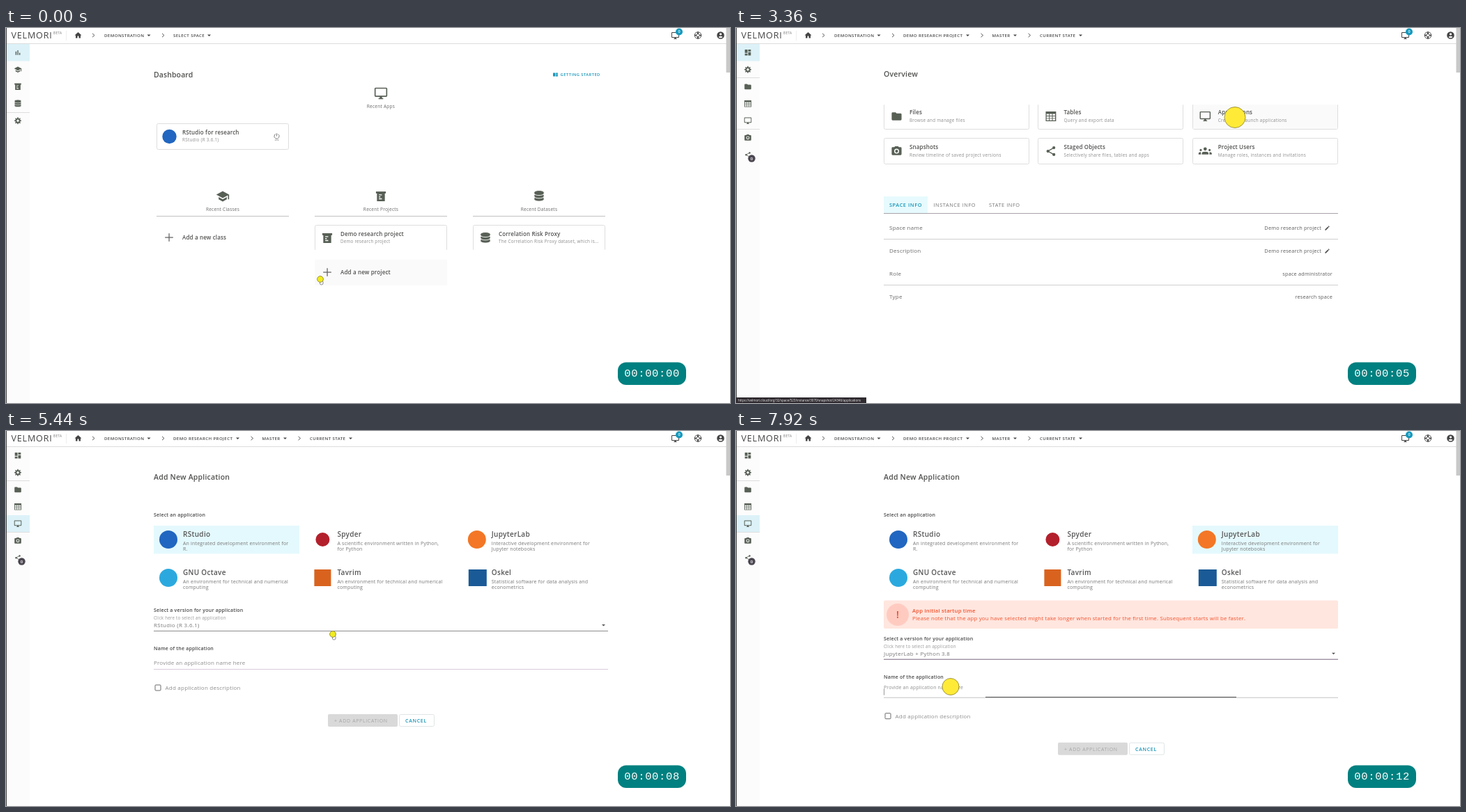
Animation of 1039 by 539 pixels, one loop 8000 ms. Source, as an HTML page with a canvas:

```html
<!DOCTYPE html>
<html lang="en">
<head>
<meta charset="utf-8">
<title>Workspace tour</title>
<style>
html, body { margin: 0; width: 100%; height: 100%; overflow: hidden; background: #fff; }
canvas { display: block; }
</style>
</head>
<body>
<canvas id="stage" width="1039" height="539"></canvas>
<script>
const ctx = document.getElementById('stage').getContext('2d');
const LOOP = 8000, STEP = 80;
const DARK = '#50524f', ICON = '#586056', GRAY = '#8b8d8b', TEAL = '#1695b8', LINE = '#c8c8c8';
const SANS = '"Open Sans", "Noto Sans", sans-serif';

const clamp = v => Math.max(0, Math.min(1, v));
const smooth = v => v * v * (3 - 2 * v);
const progress = (t, from, length) => clamp((t - from) / length);

// Text is placed by the vertical centre of its capitals.
function text(s, x, y, size, { color = DARK, weight = 400, gap = 0.2, align = 'left' } = {}) {
  ctx.font = `${weight} ${size}px ${SANS}`;
  ctx.letterSpacing = gap + 'px';
  ctx.textAlign = align;
  ctx.fillStyle = color;
  ctx.fillText(s, x, y + size * 0.36);
}
const bold = (s, x, y, size, color = DARK, gap = 0.15) => text(s, x, y, size, { color, weight: 600, gap });
const heading = s => bold(s, 212, 66, 10.5, DARK, 0.2);

function rect(x, y, w, h, color) {
  ctx.fillStyle = color;
  ctx.fillRect(x, y, w, h);
}
function hline(x1, x2, y, color = LINE) { rect(x1, y, x2 - x1, 1, color); }
function rounded(x, y, w, h, r, fill, stroke) {
  ctx.beginPath();
  ctx.roundRect(x, y, w, h, r);
  if (fill) { ctx.fillStyle = fill; ctx.fill(); }
  if (stroke) { ctx.strokeStyle = stroke; ctx.lineWidth = 1; ctx.stroke(); }
}
function disc(x, y, r, fill, stroke) {
  ctx.beginPath();
  ctx.arc(x, y, r, 0, Math.PI * 2);
  ctx.fillStyle = fill;
  ctx.fill();
  if (stroke) { ctx.strokeStyle = stroke; ctx.lineWidth = 0.8; ctx.stroke(); }
}
function openCard(x, y, w, h, openSide) {
  rounded(x + 0.5, y + 0.5, w - 1, h - 1, 2, '#fff', '#dedede');
  if (openSide === 'top') rect(x, y - 1, w, 3, '#fff');
  if (openSide === 'bottom') rect(x, y + h - 2, w, 3, '#fff');
}

// Icons live on a 24 unit grid.
const paths = {
  home: 'M10 20v-6h4v6h5v-8h3L12 3 2 12h3v8z',
  bars: 'M5 9h3v10H5zM10.6 5h2.8v14h-2.8zM16 13h3v6h-3z',
  school: 'M5 13.2v4L12 21l7-3.8v-4L12 17zM12 3L1 9l11 6 9-4.9V17h2V9z',
  folder: 'M10 4H4a2 2 0 0 0-2 2v12a2 2 0 0 0 2 2h16a2 2 0 0 0 2-2V8a2 2 0 0 0-2-2h-8z',
  board: 'M2 2h20v4h-2v16H4V6H2zM8 8v2h6V8zM8 12v2h3v-2zM8 16v2h6v-2z',
  tiles: 'M3 13h8V3H3zM3 21h8v-6H3zM13 21h8V11h-8zM13 3v6h8V3z',
  monitor: 'M3 2h18a2 2 0 0 1 2 2v12a2 2 0 0 1-2 2h-7v2h2v2H8v-2h2v-2H3a2 2 0 0 1-2-2V4a2 2 0 0 1 2-2zM3 4v12h18V4z',
  camera: 'M9 2L7.2 4H4a2 2 0 0 0-2 2v12a2 2 0 0 0 2 2h16a2 2 0 0 0 2-2V6a2 2 0 0 0-2-2h-3.2L15 2zM12 7a5 5 0 1 1 0 10 5 5 0 0 1 0-10zM12 9a3 3 0 1 0 0 6 3 3 0 0 0 0-6z',
  pencil: 'M3 17.3V21h3.8L17.8 9.9l-3.7-3.7zM20.7 7a1 1 0 0 0 0-1.4l-2.3-2.3a1 1 0 0 0-1.4 0l-1.9 1.8 3.8 3.8z',
  people: 'M12 5a3 3 0 1 1 0 6 3 3 0 0 1 0-6zM4 8a2 2 0 1 1 0 4 2 2 0 0 1 0-4zM20 8a2 2 0 1 1 0 4 2 2 0 0 1 0-4zM6 18v-2q0-3 6-3t6 3v2zM0 18v-2q0-2 4-2.5L4.5 18zM24 18v-2q0-2-4-2.5L19.5 18z',
  book: 'M1 4h10v16H1zM13 4h10v16H13zM15 8v1.5h6V8zM15 12v1.5h6V12z',
  account: 'M12 1a11 11 0 1 1 0 22 11 11 0 0 1 0-22zM12 5a3.5 3.5 0 1 0 0 7 3.5 3.5 0 0 0 0-7zM5.5 17q6.5 6 13 0-6.5-5-13 0z'
};
const shapes = Object.fromEntries(Object.entries(paths).map(([k, d]) => [k, new Path2D(d)]));

const drawn = {
  gear() {
    ctx.beginPath();
    for (let i = 0; i < 32; i++) {
      const a = (i - 0.5) / 32 * Math.PI * 2, r = i % 4 < 2 ? 10.5 : 7.5;
      ctx.lineTo(12 + r * Math.cos(a), 12 + r * Math.sin(a));
    }
    ctx.closePath();
    ctx.moveTo(15.5, 12);
    ctx.arc(12, 12, 3.5, 0, Math.PI * 2);
    ctx.fill('evenodd');
  },
  table() {
    ctx.beginPath();
    ctx.rect(1.5, 2, 21, 20);
    for (let i = 0; i < 9; i++) ctx.rect(3.3 + i % 3 * 6.2, 7.2 + Math.floor(i / 3) * 4.7, 4.8, 3.5);
    ctx.fill('evenodd');
  },
  buoy() {
    ctx.lineWidth = 2;
    for (const r of [10, 4.5]) {
      ctx.beginPath();
      ctx.arc(12, 12, r, 0, Math.PI * 2);
      ctx.stroke();
    }
    for (let i = 0; i < 4; i++) {
      const c = Math.cos(i * Math.PI / 2), s = Math.sin(i * Math.PI / 2);
      ctx.lineWidth = 4;
      ctx.beginPath();
      ctx.moveTo(12 + 5 * c, 12 + 5 * s);
      ctx.lineTo(12 + 10 * c, 12 + 10 * s);
      ctx.stroke();
    }
  },
  database() {
    const color = ctx.fillStyle;
    for (const y of [18, 12, 6]) {
      ctx.beginPath();
      ctx.ellipse(12, y, 10, 4, 0, 0, Math.PI);
      ctx.ellipse(12, y - 2, 10, 4, 0, Math.PI, 0);
      ctx.closePath();
      ctx.fillStyle = color;
      ctx.fill();
      ctx.strokeStyle = '#fff';
      ctx.lineWidth = 1.2;
      ctx.stroke();
    }
  },
  share() {
    ctx.lineWidth = 2;
    ctx.beginPath();
    ctx.moveTo(18, 5); ctx.lineTo(6, 12); ctx.lineTo(18, 19);
    ctx.stroke();
    for (const [x, y] of [[18, 5], [6, 12], [18, 19]]) disc(x, y, 3, ctx.fillStyle);
  },
  search() {
    ctx.lineWidth = 2.4;
    ctx.beginPath();
    ctx.arc(9.5, 9.5, 5.5, 0, Math.PI * 2);
    ctx.moveTo(14, 14); ctx.lineTo(20.5, 20.5);
    ctx.stroke();
  },
  power() {
    ctx.lineWidth = 1.8;
    ctx.beginPath();
    ctx.arc(12, 11, 8.5, -1.1, Math.PI + 1.1);
    ctx.moveTo(12, 1); ctx.lineTo(12, 11);
    ctx.stroke();
    for (const x of [6, 11, 16]) ctx.fillRect(x, 23, 2.4, 2.4);
  },
  plus() { ctx.fillRect(11, 2, 2.2, 20); ctx.fillRect(2, 11, 20, 2.2); },
  chevron() {
    ctx.lineWidth = 2.6;
    ctx.beginPath();
    ctx.moveTo(8, 5); ctx.lineTo(16, 12); ctx.lineTo(8, 19);
    ctx.stroke();
  },
  caret() {
    ctx.beginPath();
    ctx.moveTo(2, 8); ctx.lineTo(22, 8); ctx.lineTo(12, 18);
    ctx.fill();
  }
};

function icon(name, x, y, size, color = ICON, flip = 1) {
  ctx.save();
  ctx.translate(x, y);
  ctx.scale(size / 24 * flip, size / 24);
  ctx.translate(-12, -12);
  ctx.fillStyle = ctx.strokeStyle = color;
  if (drawn[name]) drawn[name]();
  else ctx.fill(shapes[name], 'evenodd');
  ctx.restore();
}

function topBar(inProject) {
  text('VELMORI', 7.5, 10.5, 12.5, { gap: 0.85, color: '#444' });
  text('BETA', 68, 7.5, 4.8, { color: '#777', gap: 0.3 });
  rect(86, 4, 1, 14, '#eee');
  icon('home', 103.5, 10.5, 12, '#444');
  const crumbs = inProject
    ? [['DEMONSTRATION', 141, 205], ['DEMO RESEARCH PROJECT', 240, 332.5], ['MASTER', 367.5, 400.5], ['CURRENT STATE', 436, 494.5]]
    : [['DEMONSTRATION', 141, 205], ['SELECT SPACE', 240, 291.5]];
  const arrows = inProject ? [125.5, 225.5, 353, 421] : [125.5, 225.5];
  for (const [s, x, caret] of crumbs) {
    bold(s, x, 10.5, 6.1, '#4a4a4a', 0.4);
    icon('caret', caret, 10.5, 6, '#444');
  }
  arrows.forEach(x => icon('chevron', x, 10.5, 9, '#555'));
  icon('monitor', 960.5, 11, 12, '#444');
  disc(966, 5.5, 5, '#1399bd');
  text('0', 966, 5.5, 5.5, { color: '#fff', weight: 600, align: 'center', gap: 0 });
  icon('buoy', 993, 10.5, 11.5, '#444');
  icon('account', 1025.5, 10.5, 11.5, '#444');
  hline(0, 1034, 22, '#dcdcdc');
  rect(1033.5, 0, 5.5, 64, '#c8c8c8');
}

function sideBar(names, active, rules) {
  rect(0, 23, 34, 516, '#fcfcfc');
  rect(1, 23 + active * 24.5, 33, 24.5, '#dcf2f8');
  rules.forEach(y => hline(1, 34, y, '#dedede'));
  names.forEach((n, i) => icon(n, 17, 35.3 + i * 24.5, n === 'share' ? 10 : 11.5));
  if (names.includes('share')) {
    disc(22.5, 187.5, 5.2, '#4b4650');
    text('0', 22.5, 187.5, 6, { color: '#fff', weight: 600, align: 'center', gap: 0 });
  }
  rect(0, 0, 1, 539, '#444');
}

function dashboard(t) {
  bold('Dashboard', 212, 67, 10.5, DARK, 0.1);
  icon('book', 788.5, 67, 7.5, TEAL);
  bold('GETTING STARTED', 795.5, 67, 5.8, TEAL, 0.45);
  const small = (s, x, y) => text(s, x, y, 6.5, { align: 'center', gap: 0.25, color: '#6a6a6a' });
  icon('monitor', 538, 94, 20);
  small('Recent Apps', 538, 113);
  openCard(216, 137, 190, 38);
  disc(234.5, 156, 10.2, '#2166c0');
  bold('RStudio for research', 253, 150.5, 8);
  text('RStudio (R 3.6.1)', 253, 161, 6.3, { color: GRAY, gap: 0.28 });
  icon('power', 388.5, 156, 10, '#555');
  const columns = [['school', 'Recent Classes', 311], ['board', 'Recent Projects', 538], ['database', 'Recent Datasets', 765]];
  for (const [n, s, x] of columns) {
    icon(n, x, 242, n === 'school' ? 20 : 17);
    small(s, x, 261);
    hline(x - 95, x + 95, 270, '#c2c2c2');
  }
  icon('plus', 234, 301, 14, '#666');
  bold('Add a new class', 253, 301, 8);
  openCard(443, 283, 190, 38, 'bottom');
  openCard(670, 283, 190, 38, 'bottom');
  if (t >= 960) rect(444, 285, 188, 34, '#fafafa');
  else rect(443, 333, 190, 37, '#fafafa');
  icon('board', 461, 302, 17);
  icon('database', 688, 302, 17);
  bold('Demo research project', 480, 296, 8);
  text('Demo research project', 480, 307, 6.2, { color: GRAY, gap: 0.27 });
  bold('Correlation Risk Proxy', 707, 296, 8);
  text('The Correlation Risk Proxy dataset, which is...', 707, 307, 6.3, { color: GRAY, gap: 0.25 });
  icon('plus', 461, 351, 14, '#666');
  bold('Add a new project', 480, 351, 8);
}

const tools = [
  ['folder', 'Files', 'Browse and manage files'], ['table', 'Tables', 'Query and export data'],
  ['monitor', 'Applications', 'Create and launch applications'], ['camera', 'Snapshots', 'Review timeline of saved project versions'],
  ['share', 'Staged Objects', 'Selectively share files, tables and apps'], ['people', 'Project Users', 'Manage roles, instances and invitations']
];
function overview(t) {
  heading('Overview');
  tools.forEach(([n, title, note], i) => {
    const x = 212 + (i % 3) * 221.4, y = i < 3 ? 108 : 158;
    openCard(Math.round(x), y, 209, 38, i < 3 ? 'top' : '');
    if (i === 2 && t >= 2880) rect(656, 110, 207, 35, '#fafafa');
    icon(n, x + 18.5, y + 19, n === 'people' ? 19 : 17);
    bold(title, x + 37, y + 13.5, 8);
    text(note, x + 37, y + 24.5, 6.3, { color: GRAY, gap: 0.28 });
  });
  rect(212, 242, 63, 24, '#e7fafd');
  const tabs = [['SPACE INFO', 220], ['INSTANCE INFO', 283.5], ['STATE INFO', 363]];
  tabs.forEach(([s, x], i) => text(s, x, 254.5, 7.4, { color: i ? '#777' : TEAL, gap: 0.55, weight: i ? 400 : 600 }));
  hline(212, 864, 266, '#aaa2aa');
  const rows = [['Space name', 'Demo research project'], ['Description', 'Demo research project'],
    ['Role', 'space administrator'], ['Type', 'research space']];
  rows.forEach(([label, value], i) => {
    const y = 287 + i * 33;
    text(label, 220, y, 8, { color: '#686868', gap: 0.25 });
    text(value, i < 2 ? 840 : 856, y, 7.3, { color: '#5a5a5a', align: 'right' });
    if (i < 2) icon('pencil', 848.5, y + 0.5, 8.5, '#555');
    if (i === 0 || i === 2) hline(212, 864, y + 16, '#cfcfcf');
  });
}

function applications(t) {
  heading('Applications');
  text('1 APPLICATIONS FOUND', 212, 81, 5.8, { color: '#777', gap: 0.4 });
  if (t >= 4560) rect(723, 63, 122, 18, '#fafafa');
  bold('+ ADD NEW APPLICATION', 731, 72.5, 7, '#555', 0.6);
  icon('search', 854.5, 72, 11.5, '#444');
  [['Type', 226], ['Name', 265.5], ['Status', 511], ['Description', 594], ['Actions', 793]]
    .forEach(([s, x]) => text(s, x, 106, 6.4, { color: '#5c5c5c', gap: 0.25 }));
  hline(212, 864, 118, '#d2d2d2');
  disc(233.5, 131, 7.6, '#2166c0');
  text('RStudio for research', 265.5, 131, 7, { color: TEAL });
  text('↗', 338, 128, 6, { gap: 0 });
  rounded(507, 125, 38, 12, 6, '#ff6e68');
  text('Stopped', 526, 131, 6.3, { color: '#fff', weight: 600, align: 'center', gap: 0.1 });
  text('RStudio (R 3.6.1)', 594, 131, 7, { gap: 0.32 });
  rounded(796.5, 124.5, 25, 13, 2, '#fff', '#dcdcdc');
  [806, 809, 812].forEach(x => disc(x, 131, 1, '#444'));
  const pager = (s, x) => text(s, x, 158, 6.3, { color: '#777' });
  pager('Rows per page:', 671);
  pager('10', 734);
  pager('1-1 of 1', 777);
  icon('caret', 751.5, 158, 6, '#555');
  hline(733, 757, 166, '#999');
  icon('chevron', 825, 158, 9, '#aaa', -1);
  icon('chevron', 851, 158, 9, '#aaa');
}

const catalogue = [
  ['RStudio', 'An integrated development environment for', 'R.', '#2166c0'],
  ['Spyder', 'A scientific environment written in Python,', 'for Python', '#b3202b'],
  ['JupyterLab', 'Interactive development environment for', 'Jupyter notebooks', '#f37726'],
  ['GNU Octave', 'An environment for technical and numerical', 'computing', '#2ba9df'],
  ['Tavrim', 'An environment for technical and numerical', 'computing', '#d9631e'],
  ['Oskel', 'Statistical software for data analysis and', 'econometrics', '#1a5a96']
];
function newApplication(t) {
  const notebook = t >= 6160, shift = notebook ? 40.7 : 0;
  heading('Add New Application');
  const label = (s, y) => bold(s, 212, y, 7, '#484848', 0.2);
  label('Select an application', 120);
  const picked = notebook ? 2 : 0;
  catalogue.forEach(([name, line1, line2, color], i) => {
    const x = 212 + (i % 3) * 221.4, y = 156 + Math.floor(i / 3) * 55;
    if (i === picked) rect(Math.round(x), 136, 209, 40.5, notebook && t < 6800 ? '#d5f0f9' : '#e4f9fd');
    if (i < 4) disc(x + 21, y, i === 1 ? 10 : 13, color);
    else rect(x + 9, y - 12, i === 4 ? 24 : 26, 24, color);
    bold(name, x + 42, y - 8, 10, '#555', 0.3);
    text(line1, x + 42, y + 5, 7, { color: '#777', gap: 0.18 });
    text(line2, x + 42, y + 13, 7, { color: '#777', gap: 0.18 });
  });
  if (notebook) {
    rounded(212, 243.5, 652, 40.5, 2, '#ffe6df');
    disc(232, 264, 16, '#ffcbc1');
    text('!', 232, 264, 14, { color: '#ef4a25', weight: 600, align: 'center', gap: 0 });
    bold('App initial startup time', 253, 258.5, 7.7, '#f2512c', 0.2);
    text('Please note that the app you have selected might take longer when started for the first time. Subsequent starts will be faster.',
      253, 269.5, 7.8, { color: '#f2512c', gap: 0.2 });
  }
  ctx.save();
  ctx.translate(0, shift);
  label('Select a version for your application', 257.5);
  text('Click here to select an application', 212, 269, 6.2, { color: '#999', gap: 0.22 });
  text(notebook ? 'JupyterLab + Python 3.8' : 'RStudio (R 3.6.1)', 212, 279, 7.9, { color: '#777', gap: 0.35 });
  icon('caret', 857.5, 279, 6, '#555');
  hline(212, 864, 287, !notebook ? '#8d8d8d' : t >= 6880 ? '#76657c' : '#d6c5da');
  label('Name of the application', 312.5);
  const lift = progress(t, 7840, 80);
  text('Provide an application name here', 212, 333.5 - 6 * lift, 8 - 1.1 * lift, { color: GRAY, gap: 0.2 });
  hline(212, 864, 342, notebook ? '#c4c4c4' : '#d8cbd9');
  if (t >= 7920) {
    rect(212, 330, 1, 9, '#999');
    hline(358, 718, 341.3, '#555');
  }
  rounded(214, 365, 8, 8, 1, '#fff', '#6a6a6a');
  text('Add application description', 228.5, 369.5, 8, { color: GRAY, gap: 0.23 });
  rounded(462, 407, 100, 18, 2, '#d9d9d9');
  text('+ ADD APPLICATION', 471, 416.5, 7, { color: '#a6a6a6', gap: 0.65 });
  rounded(564.5, 407.5, 50, 17, 2, '#fff', '#dfe5e7');
  bold('CANCEL', 573, 416.5, 7, TEAL, 0.7);
  ctx.restore();
}

function statusBar(s, width) {
  rect(0, 531, width, 8, '#302b30');
  text(s, 3, 535.2, 4.5, { color: '#eee', gap: 0 });
}

function clock(t) {
  const seconds = Math.floor((t + 160) / 640);
  rounded(878, 480.5, 98, 32.5, 12, '#008080');
  ctx.font = '15.5px "Liberation Mono", monospace';
  ctx.letterSpacing = '0.65px';
  ctx.textAlign = 'left';
  ctx.fillStyle = '#fff';
  ctx.fillText('00:00:' + String(seconds).padStart(2, '0'), 887.3, 500.5);
}

// Each stop: time, x, y.
const route = [
  [800, 451, 361], [1040, 518, 296], [2400, 518, 296], [2960, 716, 128.5], [4320, 716, 128.5],
  [4640, 776, 76], [5040, 776, 76], [5440, 469, 292], [6000, 735, 158], [6160, 735, 158],
  [6480, 471, 229.5], [6880, 316, 310], [6960, 316, 310], [7200, 308, 340], [7440, 308, 340], [7680, 308, 367.5]
];
const clicks = [1040, 3360, 4800, 6080, 7840];

function pointer(t) {
  const next = route.findIndex(stop => stop[0] > t);
  const b = route[next < 0 ? route.length - 1 : next];
  const a = next < 0 ? b : route[Math.max(0, next - 1)];
  const k = a === b ? 1 : smooth(progress(t, a[0], b[0] - a[0]));
  const x = a[1] + (b[1] - a[1]) * k, y = a[2] + (b[2] - a[2]) * k;
  const click = clicks.find(at => t >= at && t < at + 320);
  const radius = click ? 15 - (t - click) / STEP * 3 : 4.4;
  rounded(x - 0.5, y + 2, 4.5, 6, 2, '#fff', '#888');
  disc(x, y, radius, click ? '#ffeb37' : '#f0ec20', '#8a7d2a');
}

const projectTools = ['tiles', 'gear', 'folder', 'table', 'monitor', 'camera', 'share'];
const pages = [
  { from: 0, draw: dashboard },
  { from: 1280, draw: overview, active: 0 },
  { from: 3600, draw: applications, active: 4 },
  { from: 5040, draw: newApplication, active: 4 }
];

function render(t) {
  rect(0, 0, 1039, 539, '#fff');
  const page = pages.filter(p => t >= p.from).pop();
  const inProject = page !== pages[0];
  topBar(inProject);
  if (inProject) sideBar(projectTools, page.active, [71, 145]);
  else sideBar(['bars', 'school', 'board', 'database', 'gear'], 0, [121]);
  ctx.globalAlpha = inProject ? progress(t + STEP, page.from, 240) : 1;
  page.draw(t);
  ctx.globalAlpha = 1;
  if (t >= 1280 && t < 1760) statusBar('Waiting for api.velmori.cloud...', 347);
  if (t >= 2880 && t < 3600) statusBar('https://velmori.cloud/org/32/space/523/instance/3070/snapshot/24346/applications', 187);
  clock(t);
  pointer(t);
}

const start = performance.now();
function frame() {
  const t = (performance.now() - start) % LOOP;
  render(Math.floor(t / STEP) * STEP);
  requestAnimationFrame(frame);
}
frame();
</script>
</body>
</html>
```
